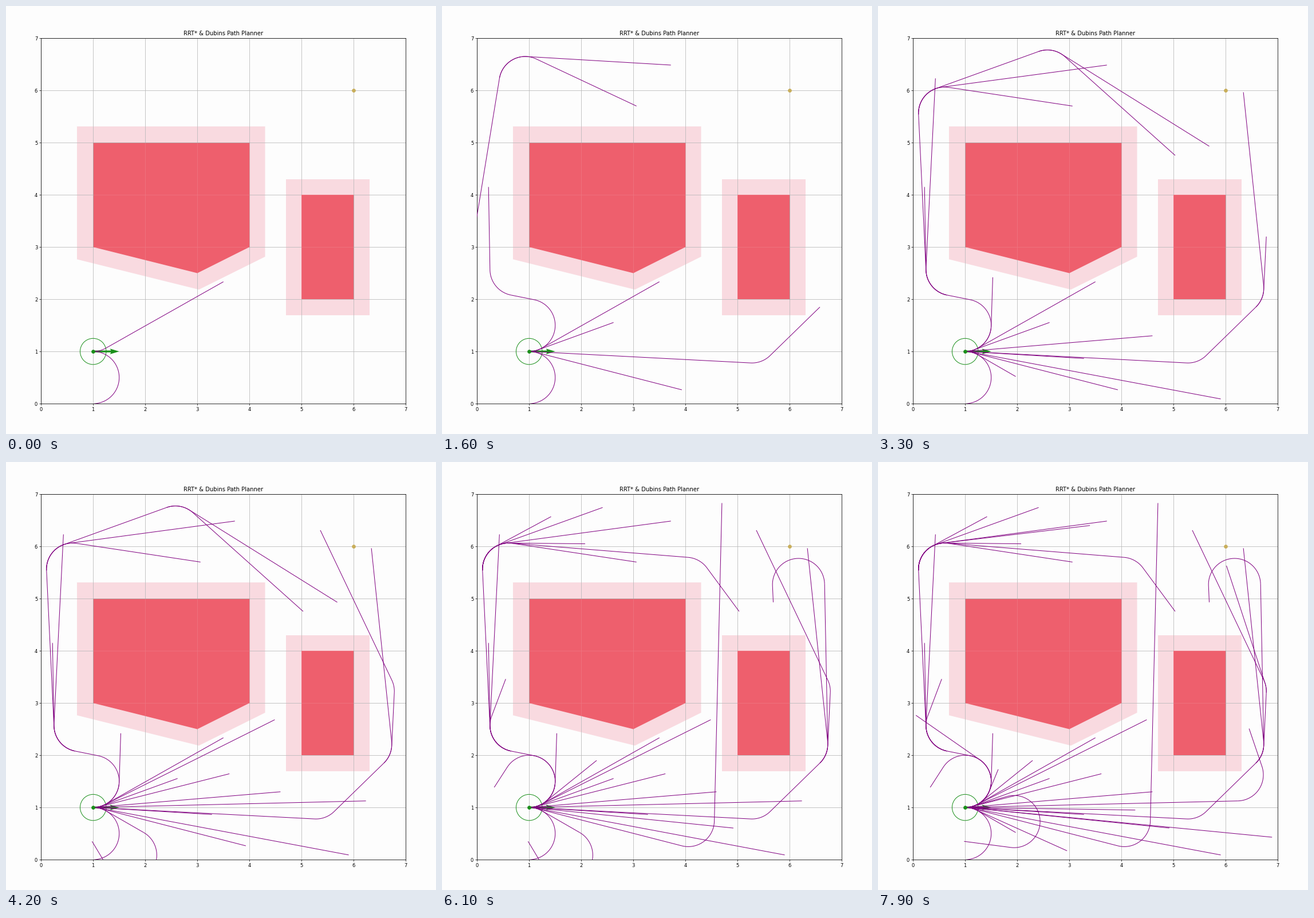
Write a matplotlib script that moves like this. It is 751 px wide and 746 px high and loops after 8 s.

```python
import math

import matplotlib.pyplot as plt
import numpy as np
from matplotlib.animation import FuncAnimation
from matplotlib.collections import LineCollection
from matplotlib.patches import Circle, Polygon

W, H, DPI = 751, 746, 72          # at 72 dpi one point is one pixel
LEFT, BOTTOM, SIDE = 61.2, 52.9, 637
STEP, FRAMES = 100, 80
RADIUS = 0.5
GREEN, GRID = "#1a8f1a", "#b8b8b8"

NODES = {
    # fan around the start
    "low": (.045, -.14), "e1": (3.5, 2.335), "e2": (3.93, .265),
    "e3": (2.62, 1.555), "e4": (5.25, .78), "e5": (1.97, .52),
    "e6": (4.595, 1.3), "e7": (5.905, .09), "e8": (1.53, 2.42),
    "e9": (3.28, .865), "e10": (3.615, 1.645), "e11": (4.485, 2.68),
    "e12": (6.235, 1.125), "e13": (2.295, 1.9), "e14": (4.92, .605),
    "e15": (.33, 1.385), "e16": (2.955, .17), "e17": (4.265, .95),
    "e18": (1.635, 1.73), "e19": (.055, 2.765), "e20": (6.89, .43),
    "e21": (1.8, 1.21), "s1": (.98, .35),
    # west side
    "w1": (.65, 2.08), "w2": (.22, 4.15), "w3": (.43, 6.23),
    "w4": (.105, 5.54), "w5": (.55, 3.46),
    # north side
    "n1": (3.72, 6.485), "n2": (3.06, 5.7), "n3": (2.41, 6.745),
    "n4": (4.05, 5.79), "n5": (1.42, 6.57), "n6": (2.075, 6.05),
    "n7": (3.395, 6.4), "n8": (4.7, 6.83), "n9": (5.03, 4.755),
    # east side
    "r1": (6.58, 1.85), "r2": (6.34, 5.965), "r3": (5.685, 4.93),
    "r4": (6.78, 3.2), "r5": (5.36, 6.31), "r6": (6.67, 5.28),
    "r7": (6.45, 2.51), "r8": (6.015, 5.63),
}

# time in ms -> new or rewired links, parent>child
LINKS = {
    0: "root>low root>e1", 100: "root>e2", 200: "root>e3", 300: "low>w3",
    600: "root>e4", 1000: "w3>n1", 1300: "e4>r1", 1400: "root>w1",
    1500: "w1>w2", 1600: "w3>n2", 1800: "root>e5", 2100: "root>e6",
    2300: "w1>w3 r1>r2", 2400: "r2>r3", 2500: "root>e7", 2700: "root>e8",
    3000: "w1>w4 w4>n1 w4>n2", 3100: "r1>r4 root>e9", 3200: "w4>n3 n3>r3",
    3300: "n3>n9", 3500: "root>e10", 3700: "r4>r5", 3900: "root>e11",
    4000: "e5>s1", 4200: "root>e12", 4300: "root>e13", 4400: "w1>w5",
    4500: "w4>n4 n4>r3", 4600: "n4>n9", 4900: "w4>n5", 5000: "root>e14",
    5300: "root>e15", 5400: "r1>r6 r6>r3", 5700: "w4>n6", 6100: "e2>n8",
    6200: "root>e16", 6300: "e12>r7", 6600: "root>e17", 6900: "r4>r8",
    7100: "root>e18", 7400: "root>e19", 7500: "w4>n7", 7600: "root>e20",
    7900: "root>e21 e21>s1",
}


def dubins(pose, goal):
    """Shortest arc-then-straight path to a point, and the final heading."""
    x, y, th = pose
    best = None
    for side in (1, -1):
        cx = x - side * RADIUS * math.sin(th)
        cy = y + side * RADIUS * math.cos(th)
        dx, dy = goal[0] - cx, goal[1] - cy
        dist = math.hypot(dx, dy)
        if dist < RADIUS:
            continue
        tangent = math.atan2(dy, dx) - side * math.acos(RADIUS / dist)
        turn = (side * (tangent - th) + math.pi / 2) % math.tau
        length = RADIUS * turn + math.sqrt(dist ** 2 - RADIUS ** 2)
        if best is None or length < best[0]:
            best = length, side, cx, cy, turn
    _, side, cx, cy, turn = best
    head = th + side * np.linspace(0, turn, 50)
    arc = np.column_stack([cx + side * RADIUS * np.sin(head),
                           cy - side * RADIUS * np.cos(head)])
    return np.vstack([arc, goal]), head[-1]


def tree_paths(ms):
    parent = {}
    for start, links in LINKS.items():
        if start <= ms:
            for link in links.split():
                a, b = link.split(">")
                parent[b] = a
    poses, paths = {"root": (1, 1, 0)}, {}

    def pose(name):
        if name not in poses:
            paths[name], head = dubins(pose(parent[name]), NODES[name])
            poses[name] = (*NODES[name], head)
        return poses[name]

    for name in parent:
        pose(name)
    return [paths[name] for name in parent]


fig = plt.figure(figsize=(W / DPI, H / DPI), dpi=DPI, facecolor="#fdfdfd")
ax = fig.add_axes([LEFT / W, BOTTOM / H, SIDE / W, SIDE / H],
                  facecolor="#fdfdfd")
ax.set(xlim=(0, 7), ylim=(0, 7))
ax.set_title("RRT* & Dubins Path Planner", fontsize=10, pad=5,
             family="DejaVu Sans")
ax.tick_params(labelsize=8.35, length=3, width=.7, pad=3)
ax.grid(color=GRID, linewidth=.8)
for spine in ax.spines.values():
    spine.set_linewidth(.8)

margins = [
    [(.69, 2.765), (.69, 5.31), (4.3, 5.31), (4.3, 2.815), (3.03, 2.185)],
    [(4.7, 1.695), (4.7, 4.3), (6.3, 4.3), (6.3, 1.695)],
]
blocks = [
    [(1, 3), (1, 5), (4, 5), (4, 3), (3, 2.5)],
    [(6, 2), (6, 4), (5, 4), (5, 2)],
]
for shape in margins:
    ax.add_patch(Polygon(shape, facecolor="#f9dae0", linewidth=0, zorder=1))
for shape, edge in zip(blocks, (3, 2)):
    block = Polygon(shape, facecolor="#ee5f6d", linewidth=0, zorder=2)
    ax.add_patch(block)
    # grid shining through, and its remains along the outline
    for lines in (ax.hlines(range(8), 0, 7), ax.vlines(range(8), 0, 7)):
        lines.set(color="#ee7580", linewidth=.8, zorder=2.1)
        lines.set_clip_path(block)
    ax.plot(*zip(*shape[:edge]), color="#b0a0a2", linewidth=.9, zorder=2.2)

ax.plot(6, 6, "o", color="#c8ae5a", markersize=6, markeredgewidth=.6,
        zorder=2.5)
ax.add_patch(Circle((1, 1), .25, fill=False, edgecolor=GREEN, linewidth=1,
                    zorder=2.5))
ax.plot(1, 1, "o", color=GREEN, markersize=6, markeredgewidth=.6, zorder=4)
ax.quiver(1, 1, .5, 0, angles="xy", scale_units="xy", scale=1, width=.005,
          color=GREEN, zorder=2.5)

tree = LineCollection([], colors="purple", linewidths=1, zorder=3)
ax.add_collection(tree, autolim=False)


def update(i):
    tree.set_segments(tree_paths(i * STEP))
    return [tree]


anim = FuncAnimation(fig, update, frames=FRAMES, interval=STEP, repeat=True,
                     repeat_delay=0, blit=False)
plt.show()
```
